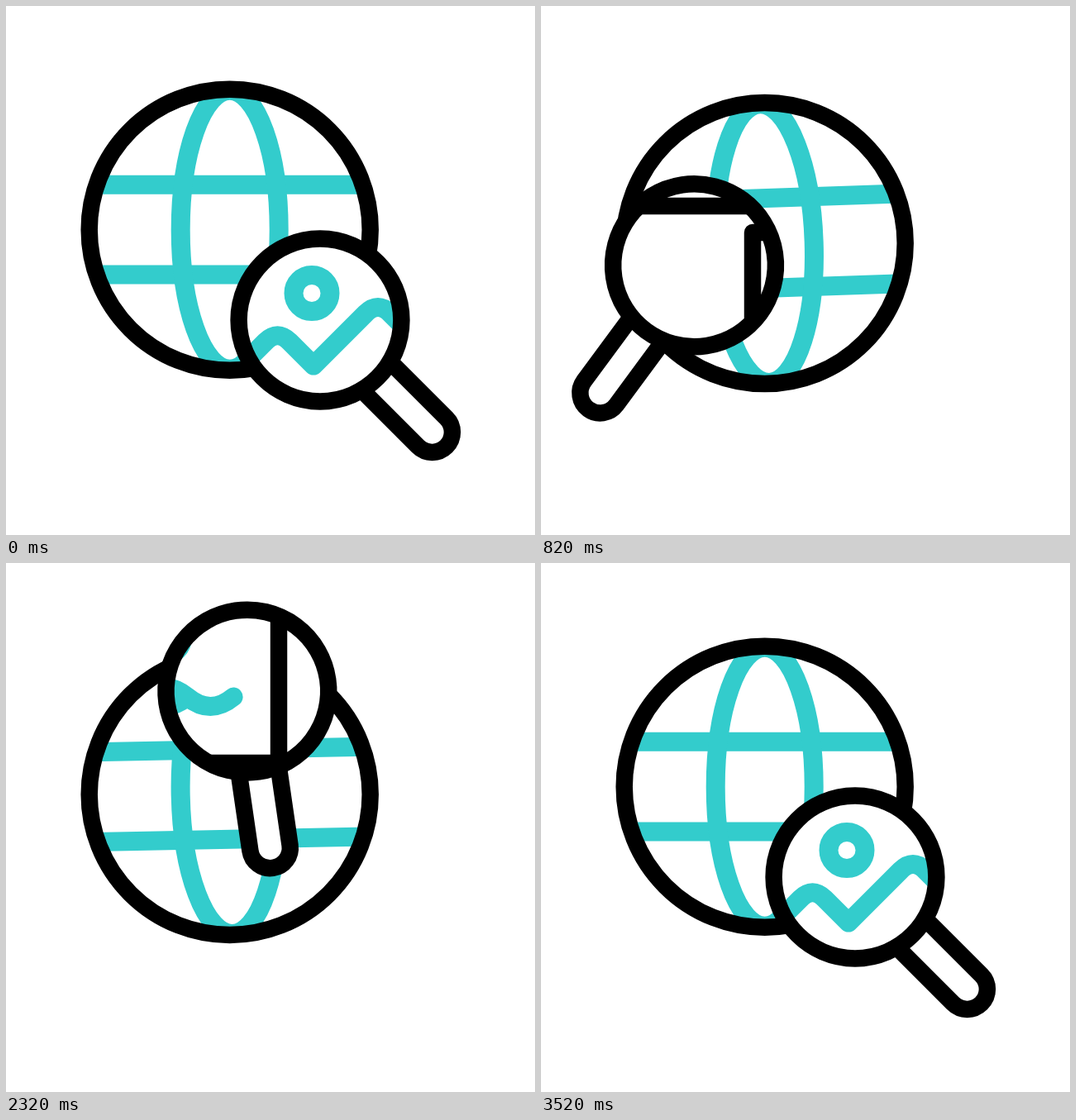
An HTML page with a canvas that plays this animation: 640x640 px, repeating every 3.6 s.

```html
<!DOCTYPE html>
<html lang="en">
<head>
<meta charset="utf-8">
<title>Image search</title>
<style>
  html, body { margin: 0; height: 100%; overflow: hidden; background: #fff; }
  canvas { display: block; }
</style>
</head>
<body>
<canvas id="stage" width="640" height="640"></canvas>
<script>
const ctx = document.getElementById('stage').getContext('2d');
const LOOP = 3600, TAU = Math.PI * 2, RAD = Math.PI / 180;
const TEAL = '#33cccc', BLACK = '#000';
const GLOBE = 270.7, LINE = 20.5, BAND = 23;

// Progress from 0 to 1 between two times, eased in and out.
function ease(t, start, end) {
  const u = Math.min(1, Math.max(0, (t - start) / (end - start)));
  return (1 - Math.cos(Math.PI * u)) / 2;
}

function pose(t) {
  const drop = 16.7 * (ease(t, 0, 900) - ease(t, 900, 1860) + ease(t, 1860, 2720) - ease(t, 2720, 3520));
  const tilt = -2.2 * ease(t, 0, 480) + 4.2 * ease(t, 700, 1450) - 4 * ease(t, 1480, 2700) + 2 * ease(t, 2760, 3500);
  // 0 on the hills picture, 1 on the sea picture; the lens sways against the globe's tilt.
  const away = ease(t, 0, 605) - ease(t, 1920, 2680);
  const x = 380 - away * (191 - 1.8 * tilt);
  const y = 380 + 10 * ease(t, 0, 600) - 271 * ease(t, 595, 1230)
    + 75 * ease(t, 1960, 2700) + 186 * ease(t, 2640, 3000);
  const turn = away * (79 - 1.25 * tilt);
  return { drop, tilt, away, x, y, turn };
}

function stroke(path, color, width) {
  ctx.strokeStyle = color;
  ctx.lineWidth = width;
  ctx.stroke(path);
}

function disc(x, y, r) {
  const p = new Path2D();
  p.arc(x, y, r, 0, TAU);
  return p;
}

function clipOutside(x, y, r) {
  const p = disc(x, y, r);
  p.rect(0, 0, 640, 640);
  ctx.clip(p, 'evenodd');
}

function layer(draw) {
  ctx.save();
  draw();
  ctx.restore();
}

const grid = new Path2D('M106 216.2H436M106 325H436');
const meridian = new Path2D();
meridian.ellipse(GLOBE, GLOBE, 59.5, 168.5, 0, 0, TAU);
const cards = new Path2D('M53 17H330V242H53ZM256 274H533V499H256Z');
const suns = [disc(191.5, 90, 22), disc(370, 347.5, 22)];
const waves = new Path2D('M108 162q28 23 55.7 0t55.7 0t55.7 0');
for (let i = 0; i < 3; i++) {
  const left = 108 + i * 55.7;
  waves.moveTo(left, 162);
  waves.quadraticCurveTo(left + 27.85, 185, left + 55.7, 162);
}
const hills = new Path2D('M256 464L314 406Q328.5 391.5 343 406L372 435L435 372Q450 357 465 372L490 397');
const handle = new Path2D('M-24.3 96V191.8A24.3 24.3 0 0 0 24.3 191.8V96');

function drawGlobe({ drop, tilt, away, x, y }) {
  const centre = GLOBE + drop;
  layer(() => {
    ctx.clip(disc(GLOBE, centre, 168));
    // The gap under the lens sinks with the globe as the lens comes home.
    clipOutside(x, y + drop * (1 - away), 90);
    ctx.translate(GLOBE, centre);
    ctx.rotate(tilt * RAD);
    ctx.translate(-GLOBE, -GLOBE);
    stroke(grid, TEAL, BAND);
    stroke(meridian, TEAL, BAND);
  });
  layer(() => {
    clipOutside(x, y, 98);
    stroke(disc(GLOBE, centre, 170), BLACK, LINE);
  });
}

function drawPictures({ x, y }) {
  layer(() => {
    ctx.clip(disc(x, y, 98));
    for (const shape of [...suns, waves, hills]) stroke(shape, TEAL, BAND);
    stroke(cards, BLACK, LINE);
  });
}

function drawLens({ x, y, turn }) {
  layer(() => {
    ctx.translate(x, y);
    ctx.rotate((turn - 45) * RAD);
    ctx.fillStyle = '#fff';
    ctx.fill(handle);
    ctx.lineCap = 'butt';
    stroke(handle, BLACK, LINE);
    stroke(disc(0, 0, 98.4), BLACK, LINE);
  });
}

function frame() {
  const now = pose(performance.now() % LOOP);
  ctx.fillStyle = '#fff';
  ctx.fillRect(0, 0, 640, 640);
  ctx.lineJoin = ctx.lineCap = 'round';
  drawGlobe(now);
  drawPictures(now);
  drawLens(now);
  requestAnimationFrame(frame);
}
frame();
</script>
</body>
</html>
```
